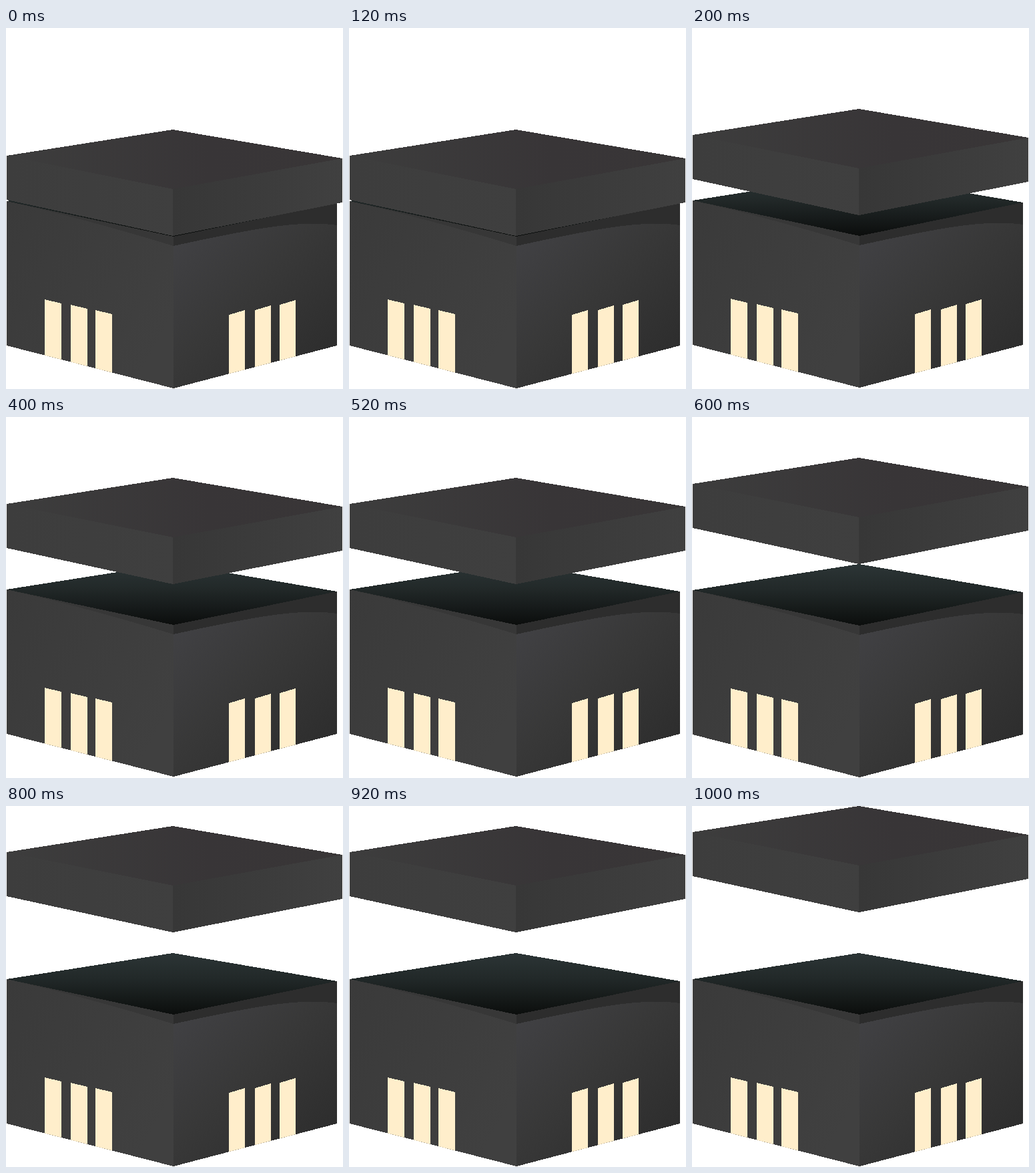
Write an HTML page that moves like this. It is 505 by 540 pixels and loops after 1.2 s.

```html
<!DOCTYPE html>
<html lang="en">
<head>
<meta charset="utf-8">
<title>Opening box</title>
<style>
  html, body { margin: 0; width: 100%; height: 100%; overflow: hidden; background: #fff; }
  svg { display: block; width: 100%; height: 100%; }
</style>
</head>
<body>
<svg viewBox="0 0 505 540" shape-rendering="crispEdges">
  <defs>
    <linearGradient id="inside" x2="0" y2="1">
      <stop stop-color="#2c3536"/><stop offset=".4" stop-color="#222929"/><stop offset="1" stop-color="#0b0d0c"/>
    </linearGradient>
    <linearGradient id="left" y2=".6">
      <stop stop-color="#3a3a3a"/><stop offset="1" stop-color="#404040"/>
    </linearGradient>
    <linearGradient id="right" x1=".1" y1=".1" x2=".8" y2=".9">
      <stop stop-color="#414144"/><stop offset=".5" stop-color="#383838"/><stop offset="1" stop-color="#2e2e2e"/>
    </linearGradient>
    <linearGradient id="lidTop">
      <stop stop-color="#3d3d3d"/><stop offset=".6" stop-color="#383537"/><stop offset="1" stop-color="#393637"/>
    </linearGradient>
    <linearGradient id="lidLeft">
      <stop stop-color="#3d3d3d"/><stop offset="1" stop-color="#3f3f3f"/>
    </linearGradient>
    <linearGradient id="lidRight">
      <stop stop-color="#373737"/><stop offset="1" stop-color="#404040"/>
    </linearGradient>
    <clipPath id="walls"><path d="M1 259L251 312L496 262V475L251 539L1 475Z"/></clipPath>
  </defs>
  <g id="base">
    <path fill="url(#inside)" d="M250 220L496 262L251 313L1 259Z"/>
    <path fill="url(#left)" d="M1 259L251 312V539L1 475Z"/>
    <path fill="url(#right)" d="M251 312L496 262V475L251 539Z"/>
    <path fill="#373737" d="M1 259L251 312V326Q120 286 1 259Z"/>
    <path fill="#2d2d2d" d="M251 312L496 262V295Q460 290 410 296Q360 302 251 326Z"/>
    <g fill="#ffeecb" clip-path="url(#walls)">
      <path d="M58 406l25 6v100h-25zM97 414l25 6v100h-25zM134 422l25 6v100h-25z"/>
      <path d="M334 429l24-7v110h-24zM373 422l24-7v110h-24zM410 414l24-7v110h-24z"/>
    </g>
  </g>
  <g id="lid">
    <path fill="url(#lidTop)" d="M250 0L504 43L250 90L1 39Z"/>
    <path fill="url(#lidLeft)" d="M1 39L250 89V159L1 105Z"/>
    <path fill="url(#lidRight)" d="M250 89L504 43V109L250 159Z"/>
  </g>
</svg>
<script>
  const base = document.getElementById("base");
  const lid = document.getElementById("lid");
  const moveY = (el, y) => el.setAttribute("transform", `translate(0 ${y})`);

  // The lid rises in six held steps; the base settles by one pixel.
  function draw() {
    const step = Math.floor(performance.now() % 1200 / 200);
    moveY(lid, Math.floor(152 - 30.4 * step + 0.3));
    moveY(base, step === 1 || step === 2 ? -1 : 0);
    requestAnimationFrame(draw);
  }
  draw();
</script>
</body>
</html>
```
